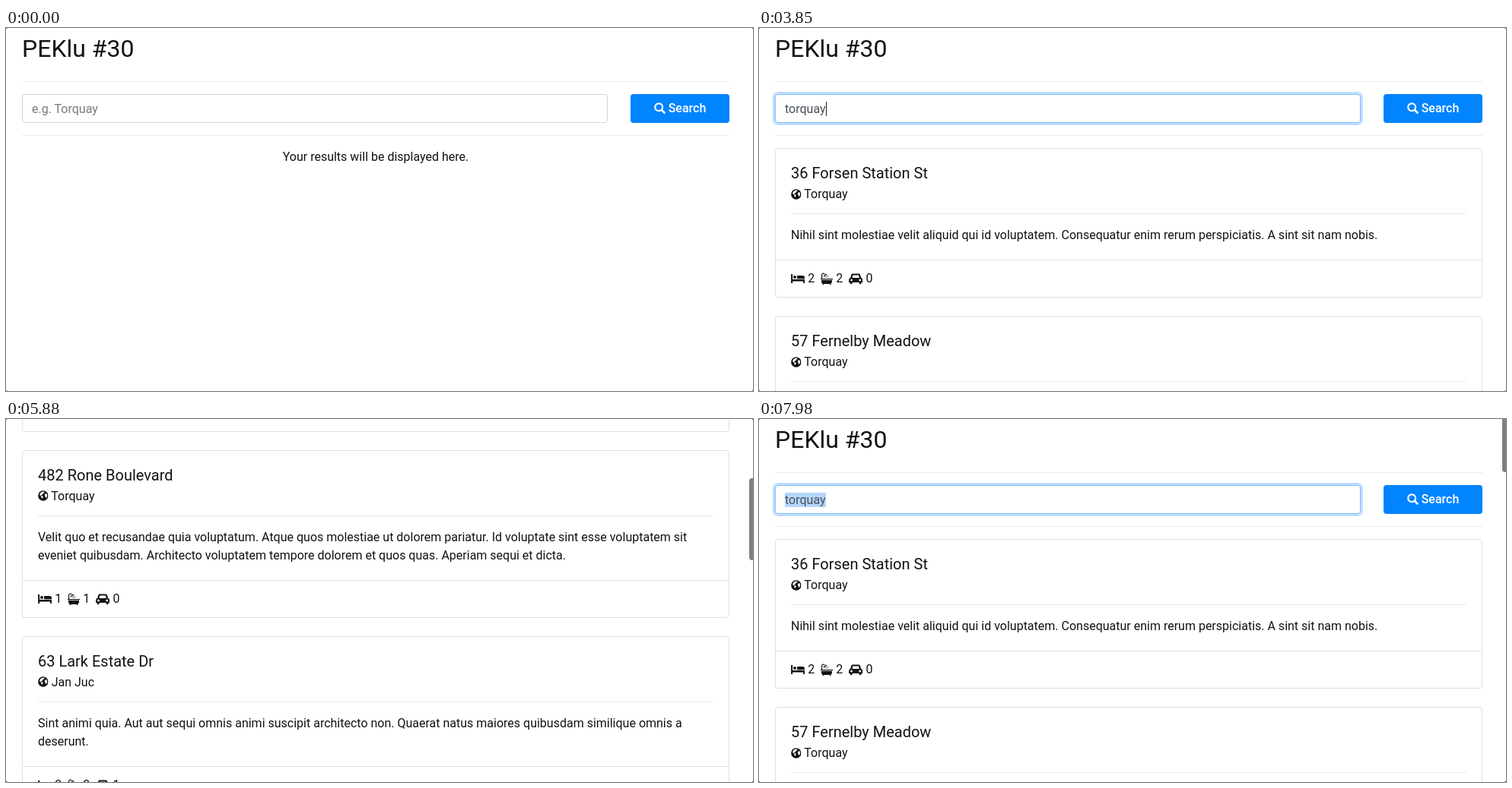
An HTML page for the animation above (8 s loop, 982 by 478 pixels).

```html
<!DOCTYPE html>
<html lang="en">
<head>
<meta charset="utf-8">
<title>Property search</title>
<style>
@property --scroll { syntax: "<number>"; inherits: true; initial-value: 0; }

* { box-sizing: border-box; }
html, body { margin: 0; width: 100%; height: 100%; overflow: hidden; background: #777; }
body { font: 16px/24px Roboto, sans-serif; color: #101214; }

.window {
  position: relative; width: 982px; height: 478px; overflow: hidden;
  background: #fff; border-radius: 3px;
  animation: scroll 8s linear infinite;
}
.page {
  position: absolute; left: 21px; width: 930px; padding-top: 7.6px;
  top: calc(var(--scroll) * -1px);
}
.thumb {
  position: absolute; left: 977px; width: 8px; height: 108px;
  top: calc(-38px + var(--scroll) * .1986px);
  border-radius: 4px; background: #7f7f7f;
  animation: thumb 8s step-end infinite;
}

h1 { margin: 0; padding-bottom: 8px; font-size: 32px; line-height: 38.4px; font-weight: 400; }
hr { margin: 16px 0; border: 0; border-top: 1px solid #e8e8e8; }
svg { fill: currentColor; }

.search { display: flex; justify-content: space-between; }
.field {
  position: relative; display: flex; align-items: center;
  width: 770px; height: 38px; padding: 0 12px;
  border: 1px solid #ced4da; border-radius: 4px;
  color: #495057; line-height: 19px;
  animation: focus 8s linear infinite;
}
.hint { position: absolute; left: 12px; color: #757a7f; animation: hint 8s step-end infinite; }
.query { animation: select 8s step-end infinite; }
.query::before { content: ""; animation: type 8s step-end infinite; }
.caret { width: 1px; height: 19px; background: #222; animation: blink 8s step-end infinite; }
.button {
  width: 130px; height: 38px; border-radius: 4px; padding-top: 7px;
  background: #0084ff; color: #fff; text-align: center; font-weight: 500;
}
.button svg { vertical-align: -1.8px; }

.results { position: relative; }
.empty { position: absolute; width: 100%; text-align: center; animation: empty 8s step-end infinite; }
.cards { animation: cards 8s step-end infinite; }
.card { margin-bottom: 24px; border: 1px solid #dfdfdf; border-radius: 4px; }
.body { padding: 20px; }
h2 { margin: 0 0 6px; font-size: 20px; line-height: 24px; font-weight: 400; }
.place { height: 19.2px; line-height: 19.2px; }
.place svg { vertical-align: -1.5px; }
p { margin: 0; white-space: nowrap; }
.facts { display: flex; height: 49px; padding: 12px 20px; border-top: 1px solid #dfdfdf; }
.facts span { display: flex; align-items: center; margin-right: 8px; }
.facts svg { margin-right: 4px; }

@keyframes scroll {
  0%, 51% { --scroll: 0; animation-timing-function: cubic-bezier(.3, .15, .7, .75); }
  59.5% { --scroll: 196; animation-timing-function: cubic-bezier(.3, .35, .6, 1); }
  68.75%, 72.5% { --scroll: 606; animation-timing-function: cubic-bezier(.5, .2, .8, .7); }
  73.5% { --scroll: 584.3; animation-timing-function: cubic-bezier(.35, .25, .7, .6); }
  81.375% { --scroll: 128; }
  83%, 100% { --scroll: 0; }
}
@keyframes focus {
  0%, 6.8% { border-color: #ced4da; box-shadow: 0 0 0 0 rgba(0, 123, 255, 0); }
  8.7%, 100% { border-color: #80bdff; box-shadow: 0 0 0 3px rgba(0, 123, 255, .25); }
}
@keyframes hint { 0% { opacity: 1; } 19.25%, 100% { opacity: 0; } }
@keyframes type {
  0% { content: ""; }
  19.25% { content: "t"; }
  21% { content: "to"; }
  22.75% { content: "tor"; }
  26.25% { content: "torq"; }
  28% { content: "torqu"; }
  28.875% { content: "torqua"; }
  30.625%, 100% { content: "torquay"; }
}
@keyframes blink {
  0%, 13.125%, 36.875%, 49.375%, 61.875%, 74.375%, 86.875%, 97.125%, 100% { opacity: 0; }
  7%, 19.25%, 43.125%, 55.625%, 68.125%, 80.625%, 93.125% { opacity: 1; }
}
@keyframes select { 0% { background: transparent; } 97.125%, 100% { background: #b3d7fd; } }
@keyframes empty { 0% { visibility: visible; } 35.875%, 100% { visibility: hidden; } }
@keyframes cards { 0% { visibility: hidden; } 35.875%, 100% { visibility: visible; } }
@keyframes thumb { 0% { opacity: 0; } 51.625%, 100% { opacity: 1; } }
</style>
</head>
<body>
<svg width="0" height="0" style="position:absolute">
  <symbol id="globe" viewBox="0 0 14 14">
    <circle cx="7" cy="7" r="6.8"/>
    <path fill="#fff" d="M6 1.6 8.2 1.4l.8 1-1.5.5.2.9-1.5.9-.6 1.2-1.5.2.5 1.1 1.7.4.8 1.2-1 1.1-.4 1.4-1.1-1.8-.2-1.7L2.7 6.800 2.300 5l1.300-2zM9.600 4.700l1.700-.8 1 2.100v1.800l-1 2-1.200-.2-.2-1.800-1-1.100z"/>
  </symbol>
  <symbol id="bed" viewBox="0 0 18 16">
    <path d="M0 2h2v7h16v5h-2v-2.5H2V14H0zM8 4h7a3 3 0 0 1 3 3v1.2H8z"/>
    <circle cx="4.9" cy="6" r="2"/>
  </symbol>
  <symbol id="bath" viewBox="0 0 16 16">
    <path fill="none" stroke="currentColor" stroke-width="1.2" d="M1.6 8V3a2 2 0 0 1 3.6-1M4 5.2 7.6 1.7"/>
    <path d="M0 8h16v1.3H0zM1 10h14v2a3 3 0 0 1-1.5 2.5V16H12v-1H4v1H2.5v-1.5A3 3 0 0 1 1 12zM6 4.8h1v1H6zM7.6 3.2h1v1h-1zM7.8 5.6h1v1h-1zM9.2 4.4h1v1h-1z"/>
  </symbol>
  <symbol id="car" viewBox="0 0 18 16">
    <path fill-rule="evenodd" d="M5 1.5h8a2 2 0 0 1 1.9 1.4L16 7a2.2 2.2 0 0 1 2 2.2V13h-1.5v.7a1.500 1.500 0 0 1-3 0V13h-9v.7a1.500 1.500 0 0 1-3 0V13H0V9.200A2.200 2.200 0 0 1 2 7l1.100-4.100A2 2 0 0 1 5 1.500zM5.200 3.500 4.400 7h9.200l-.8-3.500zM3.400 8.600a1.400 1.400 0 1 0 .01 0zM14.600 8.600a1.400 1.400 0 1 0 .01 0z"/>
  </symbol>
  <symbol id="lens" viewBox="0 0 15 15">
    <circle cx="6.2" cy="6.2" r="4.9" fill="none" stroke="currentColor" stroke-width="2.2"/>
    <path stroke="currentColor" stroke-width="2.6" stroke-linecap="round" d="m10 10 3.5 3.5"/>
  </symbol>
</svg>

<div class="window">
  <div class="page">
    <h1>PEKlu #30</h1>
    <hr>
    <div class="search">
      <div class="field">
        <span class="hint">e.g. Torquay</span><span class="query"></span><i class="caret"></i>
      </div>
      <div class="button"><svg width="15" height="15"><use href="#lens"/></svg> Search</div>
    </div>
    <hr>
    <div class="results">
      <div class="empty">Your results will be displayed here.</div>
      <div class="cards"></div>
    </div>
  </div>
  <div class="thumb"></div>
</div>

<script>
const homes = [
  ["36 Forsen Station St", "Torquay", [2, 2, 0],
    "Nihil sint molestiae velit aliquid qui id voluptatem. Consequatur enim rerum perspiciatis. A sint sit nam nobis."],
  ["57 Fernelby Meadow", "Torquay", [1, 2, 0],
    "Omnis quia accusantium dolores consequatur. Quis ex nisi praesentium omnis. Tempora alias facilis doloribus voluptatem ut<br>culpa autem. Ipsa culpa quibusdam voluptates consectetur dolores. Quia voluptatem ut eveniet et sunt velit."],
  ["482 Rone Boulevard", "Torquay", [1, 1, 0],
    "Velit quo et recusandae quia voluptatum. Atque quos molestiae ut dolorem pariatur. Id voluptate sint esse voluptatem sit<br>eveniet quibusdam. Architecto voluptatem tempore dolorem et quos quas. Aperiam sequi et dicta."],
  ["63 Lark Estate Dr", "Jan Juc", [2, 2, 1],
    "Sint animi quia. Aut aut sequi omnis animi suscipit architecto non. Quaerat natus maiores quibusdam similique omnis a<br>deserunt."]
];

const icon = (id, w, h) => `<svg width="${w}" height="${h}"><use href="#${id}"/></svg>`;
const rooms = [icon("bed", 18.3, 16), icon("bath", 16, 16), icon("car", 18.3, 16)];

const card = ([street, place, counts, text]) => `
  <div class="card">
    <div class="body">
      <h2>${street}</h2>
      <div class="place">${icon("globe", 13.7, 14)} ${place}</div>
      <hr>
      <p>${text}</p>
    </div>
    <div class="facts">${counts.map((n, i) => `<span>${rooms[i]}${n}</span>`).join("")}</div>
  </div>`;

document.querySelector(".cards").innerHTML = homes.map(card).join("");
</script>
</body>
</html>
```
